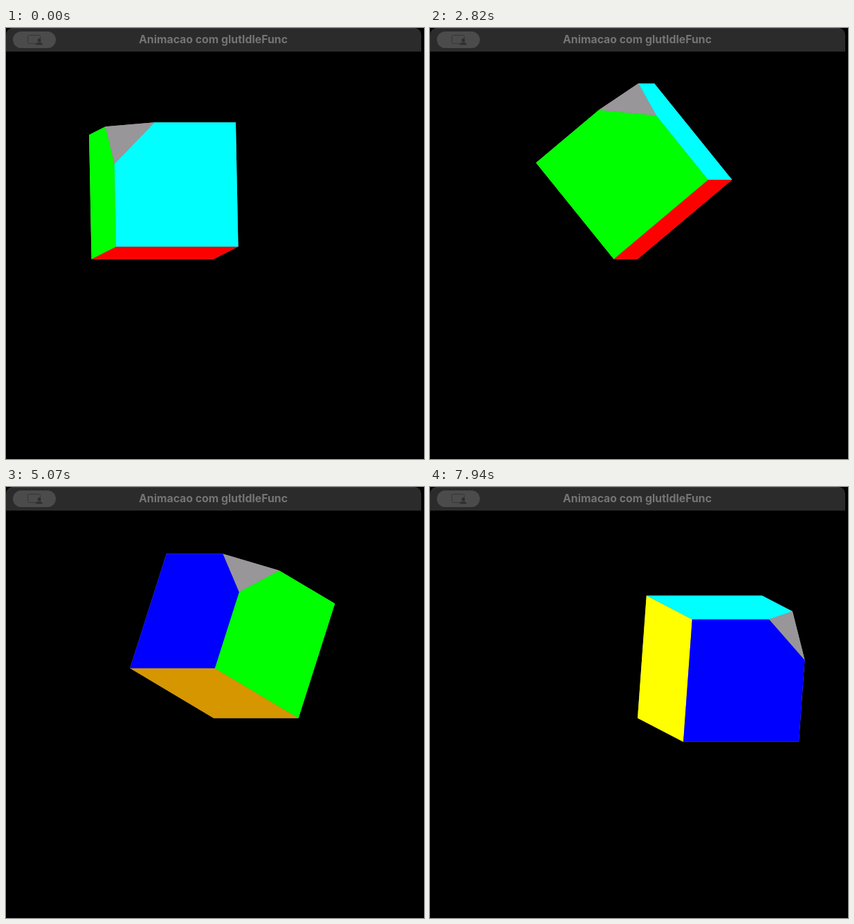
Recreate the animation shown at these times as an HTML page with a canvas. Size 604x622 px, loop 8 s.

```html
<!DOCTYPE html>
<html lang="pt">
<head>
<meta charset="utf-8">
<title>Animacao com glutIdleFunc</title>
<style>
  html, body { margin: 0; width: 100%; height: 100%; overflow: hidden; background: #000; }
  #stage { position: relative; width: 604px; height: 622px; overflow: hidden; background: #000; }
  canvas { position: absolute; left: 0; top: 0; }
  #bar {
    position: absolute; left: 0; top: 0; width: 600px; height: 34px;
    box-sizing: border-box; border-top: 1px solid #3a3a3a;
    border-radius: 10px 10px 0 0; background: #2b2b2b;
  }
  #title {
    position: absolute; left: 0; top: 0; width: 599px;
    text-align: center; white-space: nowrap; color: #747474;
    font: bold 15.85px/31px Inter, "Liberation Sans", sans-serif;
  }
  #bar svg { position: absolute; left: 10px; top: 4px; }
</style>
</head>
<body>
<div id="stage">
  <canvas id="view" width="604" height="622"></canvas>
  <div id="bar">
    <svg width="62" height="24">
      <rect width="62" height="24" rx="12" fill="#4b4b4b"/>
      <rect x="21.5" y="5.5" width="18" height="12" rx="2" fill="none" stroke="#353535"/>
      <circle cx="38" cy="12.5" r="2.5" fill="#303030"/>
      <path d="M33 19.5a5 4 0 0 1 10 0z" fill="#303030"/>
    </svg>
    <div id="title">Animacao com glutIdleFunc</div>
  </div>
</div>
<script>
const ctx = document.getElementById('view').getContext('2d');
const LOOP = 8000, STEP = 62.5;
const SIDE = 180, CX = 300, CY = 333.4;
const CUT = 2 / 3; // where the cut corner meets each edge
const START_TILT = -84.28, TILT_SPEED = 0.012; // degrees, degrees per ms

const GREY = '#999699';
const NEAR = ['#ffff00', '#d69600', '#ff0000']; // sides at x, y, z = 0
const FAR = ['#00ff00', '#00ffff', '#0000ff'];  // sides at x, y, z = 1

// Builds [x, y, z] from a value on one axis and values on the two that follow.
function onAxis(axis, value, u = 0, v = 0) {
  const point = [];
  point[axis] = value;
  point[(axis + 1) % 3] = u;
  point[(axis + 2) % 3] = v;
  return point;
}

function side(axis, level) {
  const corner = level ? [[1, CUT], [CUT, 1]] : [[1, 1]];
  const outline = [[0, 0], [1, 0], ...corner, [0, 1]];
  return {
    color: (level ? FAR : NEAR)[axis],
    normal: onAxis(axis, level ? 1 : -1),
    points: outline.map(([u, v]) => onAxis(axis, level, u, v))
  };
}

const axes = [0, 1, 2];
const faces = [
  ...axes.map(axis => side(axis, 0)),
  ...axes.map(axis => side(axis, 1)),
  { color: GREY, normal: [1, 1, 1], points: axes.map(axis => onAxis(axis, CUT, 1, 1)) }
];

// Tilts about x, then turns twice as far about y.
function rotator(tilt) {
  const a = tilt * Math.PI / 180, b = 2 * a;
  const sa = Math.sin(a), ca = Math.cos(a), sb = Math.sin(b), cb = Math.cos(b);
  return ([x, y, z]) => {
    const depth = y * sa + z * ca;
    return [x * cb + depth * sb, y * ca - z * sa, depth * cb - x * sb];
  };
}

function fillFace(points, color) {
  ctx.fillStyle = color;
  ctx.beginPath();
  for (const [x, y] of points) ctx.lineTo(CX + SIDE * x, CY - SIDE * y);
  ctx.fill();
}

function draw(t) {
  const frame = Math.floor(Math.floor(t / 10) * 10 / STEP);
  const rotate = rotator(START_TILT + TILT_SPEED * frame * STEP);
  const visible = faces
    .filter(face => rotate(face.normal)[2] > 0)
    .map(face => ({ color: face.color, points: face.points.map(rotate) }));

  ctx.clearRect(0, 0, 604, 622);
  // A grey base keeps black from showing along shared edges.
  for (const face of visible) fillFace(face.points, GREY);
  for (const face of visible) fillFace(face.points, face.color);
}

const start = performance.now();
function tick() {
  draw((performance.now() - start) % LOOP);
  requestAnimationFrame(tick);
}
tick();
</script>
</body>
</html>
```
